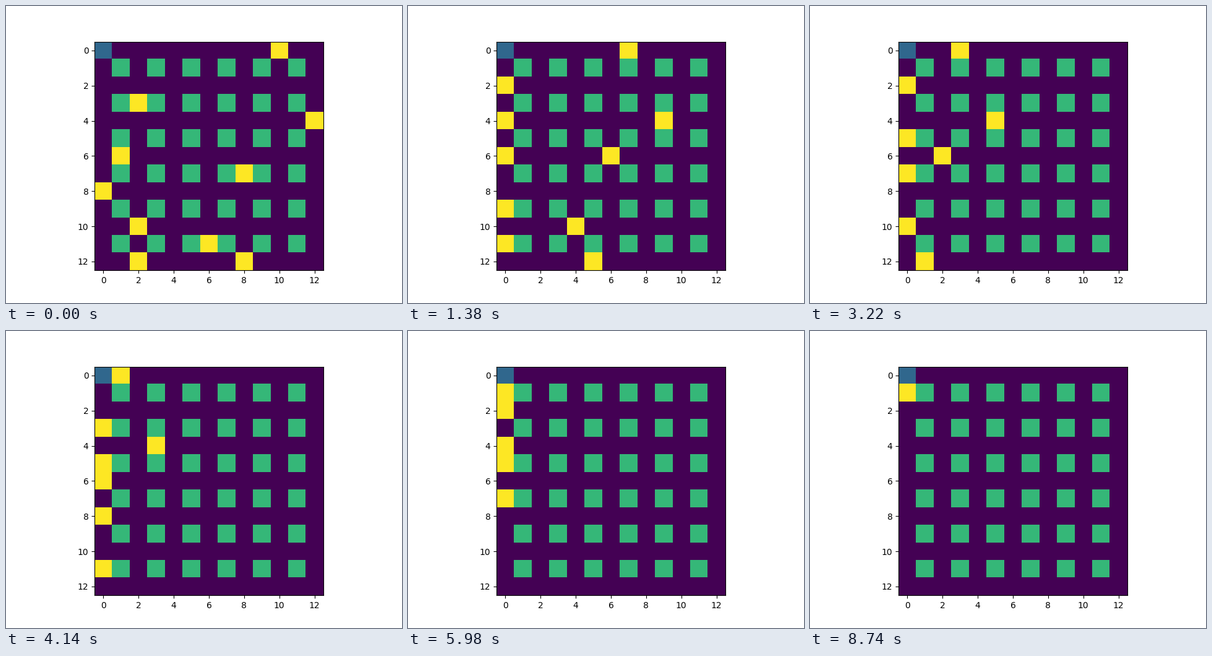
A matplotlib script for the animation above (9200 ms loop, 640 by 480 pixels).

```python
import numpy as np
import matplotlib.pyplot as plt
from matplotlib.animation import FuncAnimation

SIZE = 13
STEPS = 20
STEP_MS = 460
FLOOR, HOME, SHELF, ROBOT = range(4)
DEPOT = (0, 0)

# Start cells (row, column) in order of action; the depot acts in its own turn.
TURNS = [(0, 10), (4, 12), (8, 0), (6, 1), (10, 2), (12, 2), (11, 6), (12, 8),
         DEPOT, (3, 2), (7, 8)]


def next_cell(cell):
    """Leave the shelf row, drive left to the wall, then up to the depot."""
    row, col = cell
    if col > 0 and row % 2 == 0:
        return row, col - 1
    return row - 1, col


def advance(cells):
    """Move each robot in turn unless its way is blocked."""
    cells = dict(cells)
    for start in TURNS:
        if start == DEPOT:
            # The depot takes in any robot that stands on it.
            cells = {s: c for s, c in cells.items() if c != DEPOT}
        elif start in cells:
            target = next_cell(cells[start])
            if target not in cells.values():
                cells[start] = target
    return cells


def warehouse(cells):
    grid = np.full((SIZE, SIZE), FLOOR)
    grid[1::2, 1::2] = SHELF
    grid[DEPOT] = HOME
    for cell in cells.values():
        grid[cell] = ROBOT
    return grid


def simulate():
    cells = {start: start for start in TURNS if start != DEPOT}
    grids = []
    for _ in range(STEPS):
        grids.append(warehouse(cells))
        cells = advance(cells)
    return grids


grids = simulate()
fig, ax = plt.subplots(figsize=(6.4, 4.8), dpi=100)
image = ax.imshow(grids[0], cmap="viridis", vmin=FLOOR, vmax=ROBOT)


def update(step):
    image.set_data(grids[step])
    return [image]


anim = FuncAnimation(fig, update, frames=STEPS, interval=STEP_MS,
                     repeat=True, repeat_delay=0)
plt.show()
```
